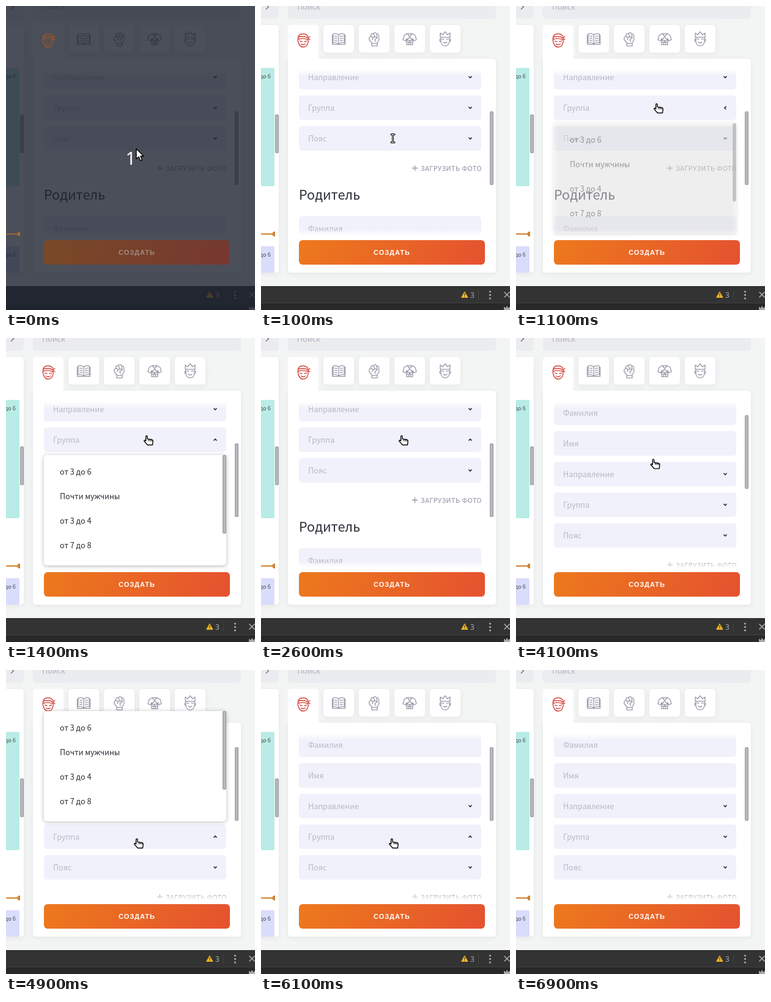
An HTML page with a canvas for the animation above (7.1 s loop, 407x496 px).

```html
<!DOCTYPE html>
<html lang="ru">
<head>
<meta charset="utf-8">
<title>Форма</title>
<style>
html, body { margin: 0; width: 100%; height: 100%; overflow: hidden; background: #f3f4f4; }
canvas { display: block; width: 407px; height: 496px; }
</style>
</head>
<body>
<canvas id="stage" width="407" height="496"></canvas>
<script>
const ctx = document.getElementById('stage').getContext('2d');
const LOOP = 7100, STEP = 100;
const SANS = '"Noto Sans CJK JP", "Noto Sans CJK SC", "Noto Sans", sans-serif';
const BODY = '12.6px ' + SANS;
const GREY = '#9797a8', FIELD = '#f0f1fb';

const clamp = v => Math.max(0, Math.min(1, v));
const progress = (t, from, to) => clamp((t - from) / (to - from));
const easeOut = (p, power) => 1 - Math.pow(1 - p, power);
const mix = (a, b, p) => a + (b - a) * p;

function box(x, y, w, h, r, fill, shadow) {
  ctx.save();
  if (shadow) {
    ctx.shadowColor = shadow.color;
    ctx.shadowBlur = shadow.blur;
    ctx.shadowOffsetY = shadow.dy;
  }
  ctx.fillStyle = fill;
  ctx.beginPath();
  ctx.roundRect(x, y, w, h, r);
  ctx.fill();
  ctx.restore();
}

function text(str, x, y, font, fill, spacing = 0) {
  ctx.font = font;
  ctx.fillStyle = fill;
  ctx.letterSpacing = spacing + 'px';
  ctx.fillText(str, x, y);
  ctx.letterSpacing = '0px';
}

function stroke(path, color, width) {
  ctx.strokeStyle = color;
  ctx.lineWidth = width;
  ctx.lineCap = ctx.lineJoin = 'round';
  ctx.stroke(path);
}

function at(x, y, draw) {
  ctx.save();
  ctx.translate(x, y);
  draw();
  ctx.restore();
}

// Tab icons, drawn around their centres
const icons = {
  ninja: new Path2D('M-8 -6C-6 -12 5 -12 8 -6M-8 -6C-10 1 -7 11 0 11C7 11 9 3 8 -3M-8.5 -5Q0 -8 8 -4M-8.5 -1.5Q0 -4.5 8 -1M8 -4L11 -6M8 -3L11 -1M-5.5 1.2L-2 2.2M5.5 1.2L2 2.2M-3.5 6Q0 8.5 3.5 6'),
  book: new Path2D('M0 -7C-3 -9.5 -7 -9 -9 -8.5V6C-6 5 -3 5.5 0 8C3 5.5 6 5 9 6V-8.5C7 -9 3 -9.5 0 -7ZM0 -7V8M-9 -6.5H-10.5V8.5H10.5V-6.5H9M-6.5 -5Q-4 -5 -2.5 -4M-6.5 -1.5Q-4 -1.5 -2.5 -.5M-6.5 2Q-4 2 -2.5 3M6.5 -5Q4 -5 2.5 -4M6.5 -1.5Q4 -1.5 2.5 -.5M6.5 2Q4 2 2.5 3'),
  fist: new Path2D('M-4 11V6L-8 1Q-9 -3 -6 -4L-5 -8Q-3 -10 -1 -8.5Q0 -11.5 3 -10L4 -8Q7 -9.5 7.5 -6L8 1L5 6V11ZM-6 -4Q-3 -5 -2 -2L-3 1M-1 -8.5L1 -3M4 -8L5 -3M-2 -2Q2 -5 5 -2L1 1L2 4M-4 7H5'),
  robe: new Path2D('M-4 -9L-9 -6L-11 1L-7 3L-5 -1V9H5V-1L7 3L11 1L9 -6L4 -9ZM-4 -9L4 1M4 -9L-4 1M-5 2H5M-5 5H5M0 3L-2 8M0 3L2 8'),
  crown: new Path2D('M-8 -3V-10L-4 -7L0 -12L4 -7L8 -10V-3ZM-7 -3V4Q-6 11 0 11Q6 11 7 4V-3M-8 0Q-10 1 -8 4M8 0Q10 1 8 4M-5 0H-2M2 0H5M-3 5Q0 8 3 5')
};

const cursors = {
  arrow: new Path2D('M0 0V16.5L4 13L6.7 19.3L9.5 18L6.8 12H12Z'),
  hand: new Path2D('M-3.4 1V-6.6Q-2.2 -8.6 -1 -6.6V-2.4L6.4 -1.2Q8.4 -.6 8.2 1.6L7.4 7.5H-.6L-6.2 1.4Q-6.6 -.4 -4.8 -.3Z'),
  beam: new Path2D('M-2.5 -6.5H2.5M0 -6.5V6.5M-2.5 6.5H2.5')
};

function drawCursor(kind, x, y) {
  at(x, y, () => {
    const path = cursors[kind];
    if (kind === 'beam') {
      stroke(path, '#000', 3);
      stroke(path, '#fff', 1);
      return;
    }
    ctx.fillStyle = '#fff';
    ctx.fill(path);
    stroke(path, '#000', 1.4);
    if (kind === 'hand') stroke(new Path2D('M1.2 -1.6V1M3.6 -1.2V1.2M6 -.8V1.4'), '#000', 1);
  });
}

function chevron(y, turn) {
  at(342, y, () => {
    ctx.rotate(Math.PI * turn);
    stroke(new Path2D('M-2.1 -1L0 1.1L2.1 -1'), '#292b35', 1.6);
  });
}

function scrollbar(x, y, h) {
  box(x, y, 6, h, 2, '#98989f');
  box(x + 1, y + 1, 4, h - 2, 1.5, '#b7b7bd');
}

function drawLeft() {
  box(-10, -20, 39, 41, 5, '#ebecf0');
  stroke(new Path2D('M8.5 -3L12.5 1L8.5 5'), '#777781', 1.6);
  box(-10, 31, 39, 404, 5, '#fff', { color: 'rgba(60,65,90,.08)', blur: 8, dy: 2 });
  box(-5, 101, 27, 193, 2, '#b9ece6');
  box(-5, 392, 27, 43, 2, '#d9dcfb');
  for (const y of [118, 409]) text('до 6', -2, y, '9px ' + SANS, '#4b5058');
  drawMarker();
  scrollbar(23, 177, 63);
}

function drawMarker() {
  ctx.save();
  ctx.beginPath();
  ctx.rect(0, 365, 23, 14);
  ctx.clip();
  ctx.fillStyle = '#d2822d';
  ctx.fillRect(0, 371, 22, 2);
  ctx.beginPath();
  ctx.arc(22.5, 372, 4, 0, Math.PI * 2);
  ctx.fill();
  ctx.restore();
}

function drawTabs() {
  const soft = { color: 'rgba(60,65,90,.08)', blur: 8, dy: 2 };
  ['book', 'fist', 'robe', 'crown'].forEach((name, i) => {
    const x = 102 + i * 58;
    box(x, 31, 50, 45, 5, '#fff', soft);
    at(x + 25, 54, () => stroke(icons[name], GREY, 1.25));
  });
  box(44, 86, 340, 349, [0, 5, 5, 5], '#fff', soft);
  box(44, 31, 50, 60, [5, 5, 0, 0], '#fff');
  drawNinja('#d0433a');
}

function drawNinja(color) {
  at(69, 56, () => stroke(icons.ninja, color, 1.4));
}

function fade(y, h, a, b) {
  const g = ctx.createLinearGradient(0, y, 0, y + h);
  g.addColorStop(0, `rgba(255,255,255,${a})`);
  g.addColorStop(1, `rgba(255,255,255,${b})`);
  ctx.fillStyle = g;
  ctx.fillRect(60, y, 304, h);
}

// label, top edge before scrolling, is a select
const fields = [
  ['Фамилия', -4, false], ['Имя', 46, false], ['Направление', 96, true],
  ['Группа', 146, true], ['Пояс', 196, true], ['Фамилия', 343, false]
];

function drawForm(scroll, turn) {
  ctx.save();
  ctx.beginPath();
  ctx.rect(60, 104, 304, 271);
  ctx.clip();
  for (const [label, top, select] of fields) {
    const y = top + scroll;
    box(62, y, 298, 40, 5, FIELD);
    text(label, 77, y + 25, BODY, '#b8b8c4');
    if (select) chevron(y + 20, label === 'Группа' ? turn : 0);
  }
  stroke(new Path2D(`M247.5 ${264.5 + scroll}h8M251.5 ${260.5 + scroll}v8`), GREY, 1.3);
  text('ЗАГРУЗИТЬ ФОТО', 261, 269 + scroll, '500 10.8px ' + SANS, '#8c8c9e', 0.5);
  text('Родитель', 62, 316 + scroll, '21.6px ' + SANS, '#2b2f38');
  fade(104, 11, 1, 0);
  fade(364, 11, 0, 1);
  ctx.restore();
  scrollbar(374, 172 - scroll * 46 / 106, 120);
}

function drawButton() {
  const g = ctx.createLinearGradient(82, 350, 346, 454);
  g.addColorStop(0, '#ed781d');
  g.addColorStop(1, '#e5532f');
  box(62, 382, 304, 40, 6, g);
  text('СОЗДАТЬ', 184, 406, 'bold 11px "Liberation Sans", Arial, sans-serif', '#fff', 1);
}

function drawList(top, alpha) {
  if (alpha <= 0) return;
  ctx.save();
  ctx.globalAlpha = alpha;
  box(62, top, 298, 180, 5, '#fff', { color: 'rgba(0,0,0,.28)', blur: 7, dy: 1 });
  ['от 3 до 6', 'Почти мужчины', 'от 3 до 4', 'от 7 до 8'].forEach((item, i) =>
    text(item, 88, top + 32 + i * 40, BODY, '#262b33'));
  scrollbar(354, top, 128);
  ctx.restore();
}

function drawToolbar() {
  ctx.fillStyle = '#292929';
  ctx.fillRect(0, 457, 407, 39);
  ctx.fillStyle = '#333';
  ctx.fillRect(0, 458, 407, 26);
  ctx.fillStyle = '#414141';
  ctx.fillRect(0, 484, 407, 1);
  ctx.fillRect(355, 463, 1, 16);
  const sign = new Path2D('M333 466.5L338 475.5H328Z');
  ctx.fillStyle = '#f4b824';
  ctx.fill(sign);
  stroke(sign, '#f4b824', 1);
  ctx.fillStyle = '#333';
  ctx.fillRect(332.4, 468.5, 1.2, 4);
  ctx.fillRect(332.4, 473.5, 1.2, 1.2);
  text('3', 342, 475.5, '12px "Noto Sans", sans-serif', '#a8adb2');
  ctx.fillStyle = '#a8adb2';
  for (const y of [466, 471.5, 477]) {
    ctx.beginPath();
    ctx.arc(374.5, y, 1.6, 0, Math.PI * 2);
    ctx.fill();
  }
  stroke(new Path2D('M398 467L406 475M406 467L398 475'), '#a8adb2', 1.6);
  ctx.beginPath();
  ctx.arc(402, 497, 5, 0, Math.PI * 2);
  ctx.fill();
  for (const dx of [-4, 0, 4]) ctx.fillRect(401 + dx, 490 + Math.abs(dx) / 3, 2, 4);
}

function drawCountdown() {
  ctx.fillStyle = 'rgba(30,36,48,.8)';
  ctx.fillRect(0, 0, 407, 496);
  ctx.save();
  ctx.globalAlpha = 0.3;
  drawButton();
  ctx.globalAlpha = 0.6;
  drawNinja('#e07a2c');
  drawMarker();
  ctx.restore();
  text('1', 195.5, 259, '29px "Noto Sans", sans-serif', '#fff');
}

// time, cursor, x, y: straight moves between neighbours
const track = [
  [0, 'arrow', 213, 233], [99, 'arrow', 213, 233],
  [100, 'beam', 215.5, 216], [200, 'hand', 219, 207], [500, 'hand', 232, 167],
  [4000, 'hand', 232, 167], [4300, 'hand', 216, 283], [6100, 'hand', 216, 283],
  [6300, 'beam', 172, 190], [6400, 'beam', 155, 153], [6599, 'beam', 155, 153],
  [6600, 'arrow', 103, 78], [6700, 'arrow', 65, 25], [6899, 'arrow', 65, 25]
];

function placeCursor(t) {
  if (t >= 6900) return;
  let i = track.length - 1;
  while (track[i][0] > t) i--;
  const [t0, kind, x0, y0] = track[i];
  const [t1, , x1, y1] = track[i + 1] || track[i];
  const p = t1 > t0 ? progress(t, t0, t1) : 0;
  drawCursor(kind, mix(x0, x1, p), mix(y0, y1, p));
}

function openness(t, start, end) {
  return t < end ? easeOut(progress(t, start, start + 400), 2) : 0;
}

function arrowTurn(t, start, end) {
  return t < end ? easeOut(progress(t, start, start + 300), 2) : 1 - progress(t, end, end + 200);
}

function render(t) {
  const scroll = 53 * (easeOut(progress(t, 3100, 3500), 2.8) + easeOut(progress(t, 3600, 4000), 2.8));
  const turn = t < 4000 ? arrowTurn(t, 1000, 2600) : arrowTurn(t, 4500, 6100);
  ctx.fillStyle = '#f3f4f4';
  ctx.fillRect(0, 0, 407, 496);
  drawLeft();
  box(44, -20, 340, 41, 5, '#ebecf0');
  text('Поиск', 59, 6, BODY, '#b0b0bb');
  drawTabs();
  drawForm(scroll, turn);
  drawButton();
  drawList(191, openness(t, 1000, 2600));
  drawList(67, openness(t, 4500, 6100));
  drawToolbar();
  if (t < 100) drawCountdown();
  placeCursor(t);
}

const start = performance.now();
function tick() {
  const t = (performance.now() - start) % LOOP;
  render(Math.floor(t / STEP) * STEP);
  requestAnimationFrame(tick);
}
tick();
</script>
</body>
</html>
```
